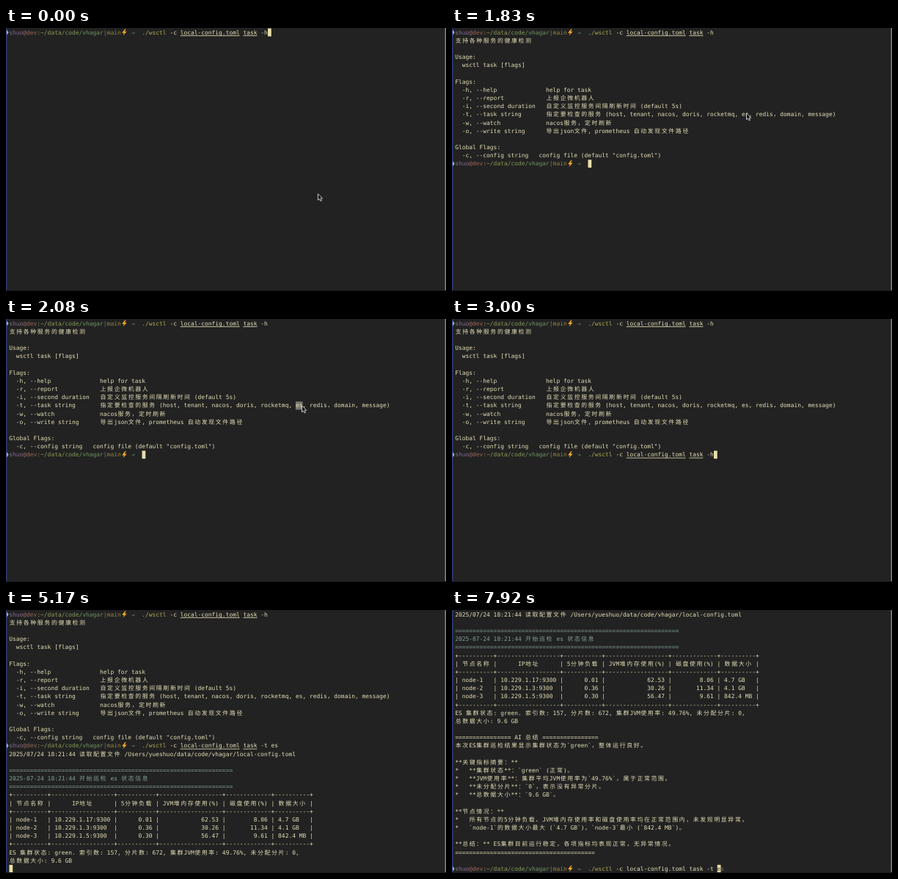
These frames come from a looping animation (600 px wide and 358 px high, 8000 ms). An HTML page:

```html
<!DOCTYPE html>
<html lang="zh-CN">
<head>
<meta charset="utf-8">
<style>
  html, body { margin: 0; width: 100%; height: 100%; overflow: hidden; background: #222; }
  svg { display: block; width: 600px; height: 358px; }
  text {
    font: 7.9px "DejaVu Sans Mono", "Noto Sans CJK SC", "Noto Sans CJK", monospace;
    white-space: pre;
    text-rendering: geometricPrecision;
  }
</style>
</head>
<body>
<svg viewBox="0 0 600 358">
  <rect width="600" height="358" fill="#222"/>
  <rect width="1.4" height="358" fill="#2c407c"/>
  <g id="screen"></g>
  <rect x="598.6" width="1.4" height="358" fill="#8c8d8f"/>
  <rect y="357" width="600" height="1" fill="#191b24"/>
  <path id="mouse" d="M0 0V8.6L2 6.8L3.5 9.9L5 9.2L3.6 6.2H6.2Z" fill="#111" stroke="#eee" stroke-width=".8"/>
</svg>
<script>
const LOOP = 8000;
const LEFT = 4.2, CELL = 4.765, TOP = 6, PITCH = 11.17;
const CREAM = "#e4deb6", TEAL = "#83a19b", DIM = "#7b7866", OLIVE = "#b0a650", BLOCK = "#e9dfa9";
const PROMPT_COLS = 38;

const svgNS = "http://www.w3.org/2000/svg";
const screen = document.getElementById("screen");
const mouse = document.getElementById("mouse");

const isWide = ch => /[\u3000-\u9fff\uff00-\uffef]/.test(ch);
const widthOf = s => [...s].reduce((n, ch) => n + (isWide(ch) ? 2 : 1), 0);
const colX = col => LEFT + col * CELL;
const rowY = row => TOP + row * PITCH;

function add(tag, attrs, content) {
  const el = document.createElementNS(svgNS, tag);
  for (const k in attrs) el.setAttribute(k, attrs[k]);
  if (content) el.textContent = content;
  screen.append(el);
}

// Places every glyph on the terminal grid.
function write(s, row, col, fill = CREAM, under = false) {
  const xs = [];
  let c = col;
  for (const ch of s) {
    xs.push((colX(c) + (isWide(ch) ? 0.5 : 0)).toFixed(2));
    c += isWide(ch) ? 2 : 1;
  }
  add("text", { x: xs.join(" "), y: rowY(row) + 2.7, fill, "xml:space": "preserve" }, s);
  if (under) add("rect", { x: colX(col), y: rowY(row) + 4, width: (c - col) * CELL, height: 0.8, fill });
  return c;
}

// A line is a string or a list of [text, colour, underlined].
function writeLine(line, row) {
  if (typeof line === "string") line = [[line]];
  let col = 0;
  for (const part of line) {
    if (part[0] === "⚡") {
      const x = colX(col), y = rowY(row);
      add("path", { d: `M${x + 5.6} ${y - 4.6}L${x + 1.4} ${y + 0.8}H${x + 4.2}L${x + 2.8} ${y + 4.6}L${x + 8} ${y - 1.2}H${x + 5}L${x + 7} ${y - 4.6}Z`, fill: "#f3a92f" });
      col += 2;
    } else if (part[0]) {
      col = write(part[0], row, col, part[1], part[2]);
    }
  }
}

const prompt = [
  ["shuo", "#86698f"], ["@dev", "#9b6758"], [":", "#97905a"], ["~/data", "#8f9752"],
  ["/code", "#7f9a55"], ["/vhagar", "#6b9662"], ["|", "#8a7a62"], ["main", "#8f8640"],
  ["⚡"], [" ⇒  ", "#5f9f5f"]
];
const command = (tail, under, hint = "") => [
  ...prompt, ["./wsctl", OLIVE], [" -c "], ["local-config.toml", CREAM, under], [" "],
  ["task", CREAM, under], [tail], [hint, DIM]
];

const help = [
  "支持各种服务的健康检测",
  "",
  "Usage:",
  "  wsctl task [flags]",
  "",
  "Flags:",
  "  -h, --help              help for task",
  "  -r, --report            上报企微机器人",
  "  -i, --second duration   自定义监控服务间隔刷新时间 (default 5s)",
  "  -t, --task string       指定要检查的服务 (host, tenant, nacos, doris, rocketmq, es, redis，domain, message)",
  "  -w, --watch             nacos服务，定时刷新",
  "  -o, --write string      导出json文件, prometheus 自动发现文件路径",
  "",
  "Global Flags:",
  "  -c, --config string   config file (default \"config.toml\")"
];

const COLS = [8, 16, 9, 16, 11, 8];
const border = "+" + COLS.map(w => "-".repeat(w + 2)).join("+") + "+";
const tableRow = cells => "| " + cells.map((s, i) => {
  const gap = " ".repeat(COLS[i] - widthOf(s));
  return i > 1 && i < 5 ? gap + s : s + gap;
}).join(" | ") + " |";
const rule = [["=".repeat(64), TEAL]];

const log = "2025/07/24 18:21:44 读取配置文件 /Users/yueshuo/data/code/vhagar/local-config.toml";
const report = [
  log,
  "",
  rule,
  [["2025-07-24 18:21:44 开始巡检 es 状态信息", TEAL]],
  rule,
  border,
  tableRow(["节点名称", "     IP地址", "5分钟负载", "JVM堆内存使用(%)", "磁盘使用(%)", "数据大小"]),
  border,
  tableRow(["node-1", "10.229.1.17:9300", "0.01", "62.53", "8.06", "4.7 GB"]),
  tableRow(["node-2", "10.229.1.3:9300", "0.36", "30.26", "11.34", "4.1 GB"]),
  tableRow(["node-3", "10.229.1.5:9300", "0.30", "56.47", "9.61", "842.4 MB"]),
  border,
  "ES 集群状态: green. 索引数: 157, 分片数: 672, 集群JVM使用率: 49.76%, 未分配分片: 0,",
  "总数据大小: 9.6 GB"
];

const bar = "=".repeat(16);
const summary = [
  "",
  `${bar} AI 总结 ${bar}`,
  "本次ES集群巡检结果显示集群状态为`green`，整体运行良好。",
  "",
  "**关键指标摘要：**",
  "*   **集群状态**：`green` (正常)。",
  "*   **JVM使用率**：集群平均JVM使用率为`49.76%`，属于正常范围。",
  "*   **未分配分片**：`0`，表示没有异常分片。",
  "*   **总数据大小**：`9.6 GB`。",
  "",
  "**节点情况：**",
  "*   所有节点的5分钟负载、JVM堆内存使用率和磁盘使用率均在正常范围内，未发现明显异常。",
  "*   `node-1`的数据大小最大 (`4.7 GB`)，`node-3`最小 (`842.4 MB`)。",
  "",
  "**总结：** ES集群目前运行稳定，各项指标均表现正常，无异常情况。",
  "=".repeat(40),
  ""
];

const first = command(" -h", true);
const helpPage = [first, ...help];
const ranPage = [...helpPage, command(" -t es", true)];
const lastPage = [...report, ...summary];

const marksOf = page => page === lastPage ? [31] : [0, 16];
const atPrompt = (page, select) => ({
  lines: [...page, prompt],
  row: page.length, col: PROMPT_COLS, select, marks: marksOf(page)
});
const typing = (page, tail, under, hint = "") => ({
  lines: [...page, command(tail, under, hint)],
  row: page.length, col: PROMPT_COLS + 33 + tail.length, under: hint[0], marks: marksOf(page)
});
const running = lines => ({ lines, row: lines.length, col: 0, marks: [0, 16] });

const steps = [
  [0, { lines: [first], row: 0, col: 74, marks: [0] }],
  [330, atPrompt(helpPage)],
  [2000, atPrompt(helpPage, true)],
  [2580, typing(helpPage, " -h", true)],
  [3170, typing(helpPage, " -", true)],
  [3580, typing(helpPage, " -t", true)],
  [3670, typing(helpPage, " -t ", true)],
  [3750, typing(helpPage, " -t ", false, "nacos")],
  [4080, typing(helpPage, " -t e", false, "nacos")],
  [4165, typing(helpPage, " -t es", false, "nacos")],
  [4250, typing(helpPage, " -t es", false)],
  [4420, running([...ranPage, log])],
  [4580, running([...ranPage, ...report])],
  [5670, atPrompt(lastPage)],
  [6920, typing(lastPage, " -t es", true)],
  [7330, typing(lastPage, " -t e", true)],
  [7420, typing(lastPage, " -t ", true)],
  [7670, typing(lastPage, " -t ", false, "es")]
];

function draw(s) {
  screen.textContent = "";
  if (s.select) add("rect", { x: colX(82), y: rowY(10) - 5.4, width: CELL * 2, height: PITCH, fill: "#77766f" });
  for (const r of s.marks) {
    const y = rowY(r);
    add("path", { d: `M1 ${y - 3.6}L3.6 ${y}L1 ${y + 3.6}Z`, fill: "#a4b4c8" });
  }
  s.lines.forEach(writeLine);
  add("rect", { x: colX(s.col) + 0.2, y: rowY(s.row) - 5.4, width: CELL, height: 10.8, fill: BLOCK });
  if (s.under) write(s.under, s.row, s.col, "#55523f");
}

// Pointer: time, x, y; hidden between the two stretches.
const paths = [
  [[0, 425.4, 225.7], [920, 425.4, 225.7], [1250, 417, 180], [1670, 401.5, 117], [1830, 401.5, 116], [2000, 403.5, 118], [2580, 403.5, 118]],
  [[5920, 432.2, 167.7], [6920, 432.2, 167.7]]
];

function pointer(t) {
  const path = paths.find(p => t >= p[0][0] && t < p[p.length - 1][0]);
  if (!path) return null;
  const i = path.findIndex(p => p[0] > t);
  const [a, b] = [path[i - 1], path[i]];
  const k = (t - a[0]) / (b[0] - a[0]);
  return [a[1] + (b[1] - a[1]) * k, a[2] + (b[2] - a[2]) * k];
}

let shown = null;
const start = performance.now();

function tick(now) {
  const t = Math.max(0, now - start) % LOOP;
  const state = steps.filter(s => s[0] <= t).pop()[1];
  if (state !== shown) draw(shown = state);
  const at = pointer(t);
  mouse.setAttribute("visibility", at ? "visible" : "hidden");
  if (at) mouse.setAttribute("transform", `translate(${at[0].toFixed(2)} ${at[1].toFixed(2)})`);
  requestAnimationFrame(tick);
}
tick(start);
</script>
</body>
</html>
```
